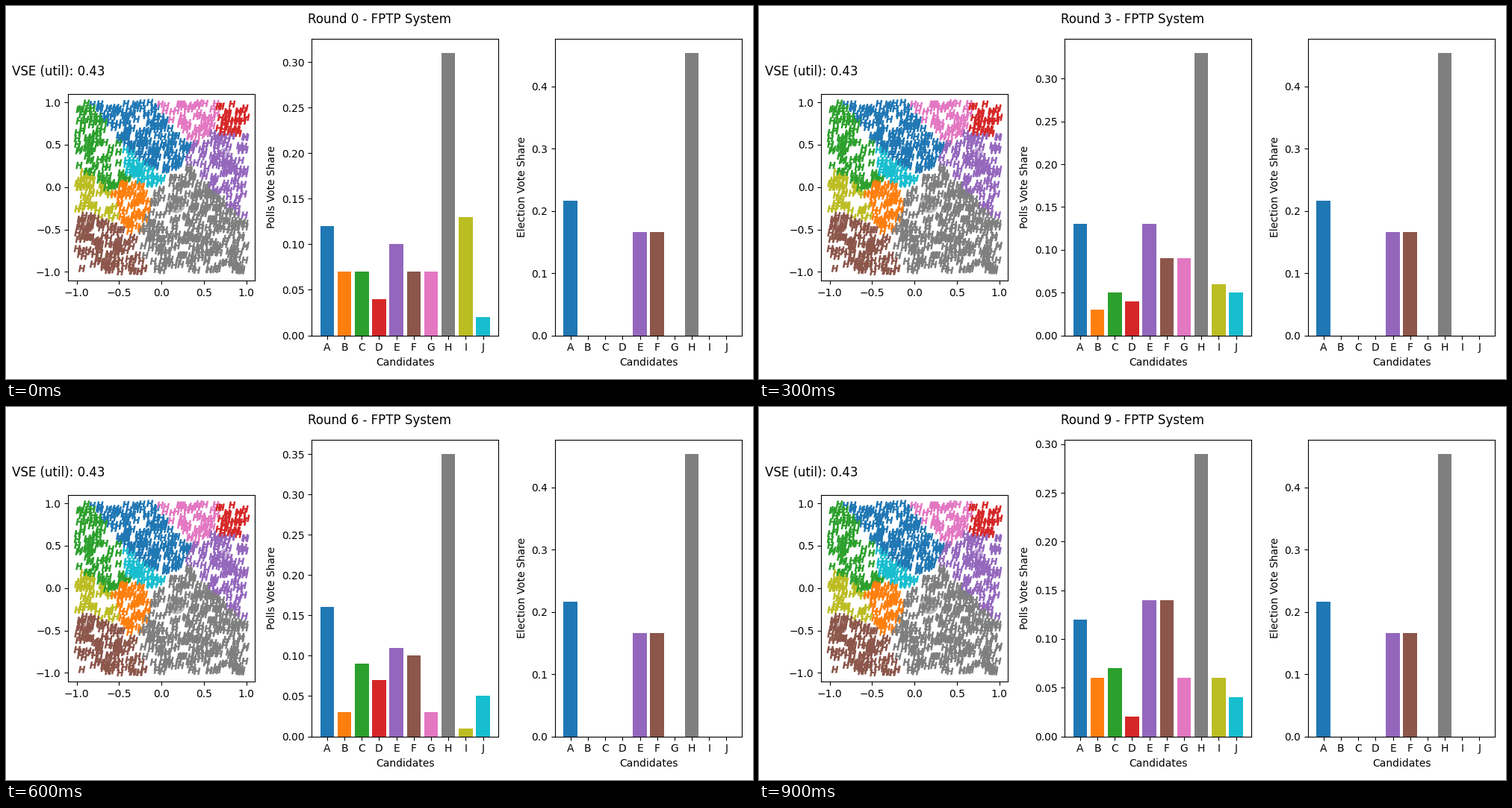
A matplotlib script that plays this animation: 1000x500 px, repeating every 1000 ms.

```python
import numpy as np
import matplotlib.pyplot as plt
from matplotlib.animation import FuncAnimation

W, H = 1000, 500
ROUNDS = 10
NAMES = list("ABCDEFGHIJ")
COLORS = np.array([f"C{i}" for i in range(10)])
CANDIDATES = np.array([
    (-0.10, 0.44), (-0.40, -0.03), (-0.50, 0.13), (0.82, 0.87), (0.745, 0.40),
    (-0.865, -0.47), (0.475, 0.884), (0.17, -0.20), (-0.76, -0.19), (-0.285, 0.184),
])

# Only the front runners get votes in the election
VOTES = {"A": 0.216, "E": 0.1665, "F": 0.1655, "H": 0.4535}
ELECTION = np.array([VOTES.get(name, 0) for name in NAMES])

# Key polls in percent for A to I; J gets the rest
KEY_POLLS = {
    0: (12, 7, 7, 4, 10, 7, 7, 31, 13),
    2: (21, 1, 9, 3, 11, 12, 2, 34, 5),
    3: (13, 3, 5, 4, 13, 9, 9, 33, 6),
    5: (14, 6, 8, 5, 11, 10, 12, 30, 3),
    6: (16, 3, 9, 7, 11, 10, 3, 35, 1),
    7: (16, 4, 8, 1, 12, 7, 9, 29, 12),
    9: (12, 6, 7, 2, 14, 14, 6, 29, 6),
}


def poll(i):
    """Vote shares in round i, halfway values between key polls."""
    known = [np.interp(i, list(KEY_POLLS), col) for col in zip(*KEY_POLLS.values())]
    percent = np.round(known)
    return np.append(percent, 100 - percent.sum()) / 100


def add_axes(left, bottom, width, height):
    return fig.add_axes([left / W, bottom / H, width / W, height / H])


def fit_height(ax, shares):
    ax.set_ylim(0, 1.05 * shares.max())


def bar_chart(left, label, shares):
    ax = add_axes(left, 58.5, 250, 397.4)
    bars = ax.bar(NAMES, shares, color=COLORS)
    ax.set_xlabel("Candidates")
    ax.set_ylabel(label)
    fit_height(ax, shares)
    return ax, bars


fig = plt.figure(figsize=(W / 100, H / 100), dpi=100)
title = fig.suptitle("", y=0.982)

ax_map = add_axes(83.3, 132.2, 250, 250)
voters = np.random.default_rng(7).uniform(-1, 1, (1000, 2))
nearest = np.hypot(*(voters[:, None] - CANDIDATES).T).argmin(axis=0)
ax_map.scatter(*CANDIDATES.T, s=700 * ELECTION, c=COLORS, alpha=0.5, linewidths=0)
ax_map.scatter(*voters.T, c=COLORS[nearest], marker="$H$")
ticks = np.linspace(-1, 1, 5)
ax_map.set(xlim=(-1.1, 1.1), ylim=(-1.1, 1.1), xticks=ticks, yticks=ticks)
ax_map.text(-0.3, 1.1, "VSE (util): 0.43", fontsize=12, transform=ax_map.transAxes)

ax_polls, poll_bars = bar_chart(409.23, "Polls Vote Share", poll(0))
bar_chart(735.1, "Election Vote Share", ELECTION)


def update(i):
    shares = poll(i)
    title.set_text(f"Round {i} - FPTP System")
    for bar, share in zip(poll_bars, shares):
        bar.set_height(share)
    fit_height(ax_polls, shares)
    return [title, *poll_bars]


anim = FuncAnimation(fig, update, frames=ROUNDS, interval=100, repeat=True)
plt.show()
```
